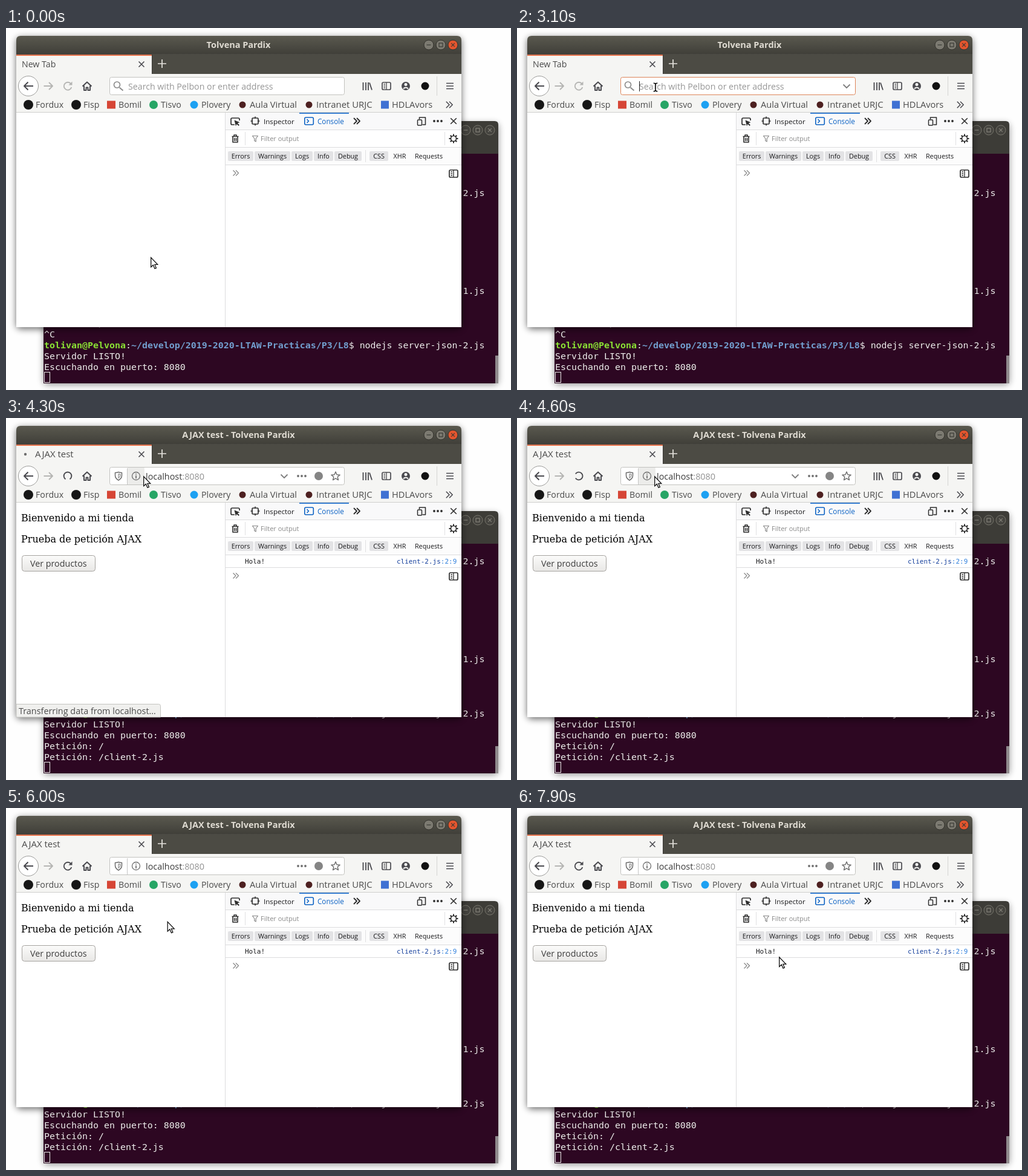
These frames come from a looping animation (835 by 599 pixels, 8000 ms). An HTML page:

```html
<!DOCTYPE html>
<html lang="es">
<head>
<meta charset="utf-8">
<title>AJAX test</title>
<style>
html, body { margin: 0; width: 100%; height: 100%; overflow: hidden; background: #fefefe; }
svg { display: block; width: 100%; height: 100%; }
text { font-family: "Open Sans", "Noto Sans", sans-serif; white-space: pre; }
.mono { font-family: "DejaVu Sans Mono", monospace; }
.serif { font-family: "DejaVu Serif", serif; }
.b { font-weight: 700; }
</style>
</head>
<body>
<svg id="stage" viewBox="0 0 835 599"></svg>
<script>
const LOOP = 8000;
const LOADED = 4300;
const INK = '#4a4a4f', GRAY = '#8c8c8c', DARK = '#2e2e2e', BLUE = '#0b62c4';
const stage = document.getElementById('stage');

// Drawing helpers
const text = (x, y, s, size = 14.2, fill = '#4b4b4b', more = '') =>
  `<text x="${x}" y="${y}" font-size="${size}" fill="${fill}" ${more}>${s}</text>`;
const box = (x, y, w, h, fill, more = '') =>
  `<rect x="${x}" y="${y}" width="${w}" height="${h}" fill="${fill}" ${more}/>`;
const disc = (x, y, r, fill, more = '') =>
  `<circle cx="${x}" cy="${y}" r="${r}" fill="${fill}" ${more}/>`;
const path = (d, stroke = INK, w = 1.6, more = '') =>
  `<path d="${d}" fill="none" stroke="${stroke}" stroke-width="${w}" stroke-linejoin="round" ${more}/>`;
const group = (id, body, more = '') => `<g id="${id}" ${more}>${body}</g>`;
const bold = s => `<tspan class="b">${s}</tspan>`;
const paint = (s, fill, cls = '') => `<tspan fill="${fill}" class="${cls}">${s}</tspan>`;

// Small icons
const cross = (x, y, r, c, w) => path(`M${x - r} ${y - r}l${2 * r} ${2 * r}m0 ${-2 * r}l${-2 * r} ${2 * r}`, c, w);
const guillemet = (x, y, c, r = 5, w = 1.6) =>
  path(`M${x - r} ${y - r}l${r} ${r} ${-r} ${r}m${r} ${-2 * r}l${r} ${r} ${-r} ${r}`, c, w);
const chevron = (x, y) => path(`M${x - 5.5} ${y - 2.5}l5.5 5.5 5.5 -5.5`, '#808080', 1.8);
const dots = (x, y, c, gap = 6) => [-gap, 0, gap].map(d => disc(x + d, y, 1.9, c)).join('');
const gear = (x, y, r, c) => {
  let d = '';
  for (let i = 0; i < 8; i++) {
    const a = i * Math.PI / 4, u = Math.cos(a), v = Math.sin(a);
    d += `M${x + u * r} ${y + v * r}L${x + u * (r + 3)} ${y + v * (r + 3)}`;
  }
  return disc(x, y, r, 'none', `stroke="${c}" stroke-width="1.7"`) + path(d, c, 2);
};
const globe = (x, y, c) => disc(x, y, 7.2, 'none', `stroke="${c}" stroke-width="1.4"`) +
  `<ellipse cx="${x}" cy="${y}" rx="3.4" ry="7.2" fill="none" stroke="${c}" stroke-width="1.2"/>` +
  path(`M${x - 6.5} ${y - 2.6}h13M${x - 6.5} ${y + 2.6}h13`, c, 1.2);
const panel = (x, y, c) => box(x - 7, y - 6, 14, 12, 'none', `rx="2" stroke="${c}" stroke-width="1.7"`) +
  path(`M${x} ${y - 6}v12M${x - 4.5} ${y - 3}h2.5m-2.5 3h2.5m-2.5 3h2.5`, c, 1.3);
const windowButtons = (x, y, close, rim, fill, mark) => [0, 1, 2].map(i => {
  const cx = x + i * 20;
  return disc(cx, y, 8, i == 2 ? close : fill, `stroke="${rim}" stroke-width="1"`) + [
    path(`M${cx - 3.5} ${y}h7`, mark, 1.2),
    box(cx - 3, y - 3, 6, 6, 'none', `stroke="${mark}" stroke-width="1.2"`),
    cross(cx, y, 2.8, mark, 1.2)][i];
}).join('');

function terminal() {
  const row = (y, s, id) => text(63, y + 5, s, 14.95, '#eeeeec', `class="mono"${id ? ` id="${id}"` : ''}`);
  const prompt = n => paint('tolivan@Pelvona', '#8ae234', 'b') + ':' +
    paint('~/develop/2019-2020-LTAW-Practicas/P3/L8', '#729fcf', 'b') + `$ nodejs server-json-${n}.js`;
  const history = [[273, prompt(2)], [435, prompt(1)], [489, 'Petición: /'], [507, '^C'],
    [525, prompt(2)], [543, 'Servidor LISTO!'], [561, 'Escuchando en puerto: 8080']];
  return box(62, 158, 752, 432, '#000', 'rx="6" opacity=".42" filter="url(#soft)"') +
    `<path d="M62 588V160q0-6 6-6H808q6 0 6 6V588z" fill="#3d3c37"/>` +
    windowButtons(760, 169, '#45443f', '#77756c', '#45443f', '#85837a') +
    box(62, 208, 752, 380, '#2d0722') +
    '<g clip-path="url(#screen)">' +
    group('log', history.map(r => row(...r)).join('') +
      group('requests', row(579, 'Petición: /') + row(597, 'Petición: /client-2.js'))) + '</g>' +
    box(63.5, 569.5, 9, 17, 'none', 'stroke="#eeeeec"') +
    box(809, 542, 5, 46, '#8f8a8c', 'id="thumb"');
}

function toolbar() {
  const marks = [[49, 'Fordux'], [128, 'Fisp'], [186, 'Bomil'], [256, 'Tisvo'], [323, 'Plovery'],
    [403, 'Aula Virtual', 14.6], [513, 'Intranet URJC', 14.9], [638, 'HDLAvors', 14.6]];
  return path('M45 96H30m6 -6l-6 6 6 6', INK, 1.9) +
    disc(37, 96, 16.5, '#fff', 'stroke="#9b9b99"') + path('M45 96H30m6.5 -6.5l-6.5 6.5 6.5 6.5', INK, 2) +
    path('M62.5 96H77m-6 -6l6 6 -6 6', '#b5b5b3', 1.9) +
    group('reload', path('M107.2 92.2A6.4 6.4 0 1 0 108.3 98', 'currentColor', 1.9) +
      '<path d="M109.5 88.5v6h-6z" fill="currentColor"/>') +
    group('spin', path('M98.5 101.2A6.4 6.4 0 1 1 105.5 101.2', INK, 1.9)) +
    path('M126.5 96.5L134 89.5l7.500 7M129 95.500V103h3.500v-4.500h3V103h3.500V95.500', INK, 2) +
    path('M590.5 90v13M595 90v13M599 90v13M601 90.500l4 12', INK, 1.8) + panel(629, 96, INK) +
    disc(661, 96, 7, INK) + disc(661, 93.600, 2.5, '#f5f5f3') +
    path('M657 100.500q4 -4 8 0', '#f5f5f3', 1.8) + disc(693, 96, 6.5, '#111') +
    path('M712.5 80v32', '#d5d5d2', 1) + path('M728 91.500h12m-12 4.500h12m-12 4.500h12', INK, 1.6) +
    disc(37, 127, 8, '#161616') + disc(116, 127, 8, '#161616') + box(167, 120.500, 14, 13, '#d64535') +
    disc(244, 127, 7, '#27a565') + disc(311, 127, 6.5, '#1da1f2') +
    disc(391, 127, 5.5, '#4d2020') + disc(501, 127, 5.5, '#4d2020') + box(620, 120.500, 13, 13, '#3f71d3') +
    marks.map(([x, s, size]) => text(x, 132, s, size)).join('') + guillemet(733, 127, INK, 5.2);
}

function addressBar() {
  const lens = path('M187.6 98.400L193.5 103.500', GRAY, 2) +
    disc(183.5, 94, 5, 'none', `stroke="${GRAY}" stroke-width="1.7"`);
  const star = Array.from({length: 10}, (_, i) => {
    const a = i * Math.PI / 5 - Math.PI / 2, r = i % 2 ? 3.4 : 7.5;
    return `${545 + r * Math.cos(a)},${96.5 + r * Math.sin(a)}`;
  });
  return box(171.5, 81.5, 388, 29, '#fff', 'id="bar" rx="3"') +
    group('lens', lens) +
    text(202, 102, 'Search with Pelbon or enter address', 14.2, '#969696', 'id="hint"') +
    text(202, 102, 'localhost:8080', 14.4, '#3a3a3a', 'id="typed"') +
    group('go', path('M537 96h15m-6 -6l6 6 -6 6', '#808080', 1.7)) +
    group('site', box(201, 82, 28, 28, '#ececea', 'id="glow"') +
      path('M180.500 90.500q3 0 5.500 -1 2.500 1 5.500 1v4.500q0 5 -5.500 8 -5.500 -3 -5.500 -8z', '#6e6e6e', 1.5) +
      path('M186 92.500v7q3 -2 3 -4.500v-2q-1.500 0 -3 -.5', '#6e6e6e', 1) +
      path('M200.500 83v27', '#c5c5c5', 1) + disc(215, 96, 6.5, 'none', 'stroke="#6e6e6e" stroke-width="1.3"') +
      path('M215 95v5M215 92v1.600', '#6e6e6e', 1.7) +
      text(231, 102, 'localhost' + paint(':8080', '#909090'), 14.4, '#3a3a3a') +
      dots(489, 96, '#707070') + disc(517, 96, 7, '#858585') +
      `<polygon points="${star.join(' ')}" fill="none" stroke="#707070" stroke-width="1.5" stroke-linejoin="round"/>`) +
    group('arrowDown', chevron(0, 96)) + path('M0 88v17', '#222', 1, 'id="caret"');
}

function devtools() {
  const filters = [[367, 42, 'Errors'], [411, 59, 'Warnings'], [472, 35, 'Logs'], [509, 32, 'Info'],
    [543, 45, 'Debug'], [601, 31, 'CSS'], [640, 22, 'XHR', 1], [676, 46, 'Requests', 1]];
  return box(363, 140, 390, 28, '#f9f9fa') + box(363, 198, 390, 28, '#fcfcfc') +
    path('M362.5 140V495M363 168.500H753M363 197.500H753M363 226.500H753', '#dcdcde', 1) +
    path('M378 160h-4q-2 0 -2 -2v-7q0 -2 2 -2h10q2 0 2 2v2', DARK, 1.7) +
    `<path d="M377.500 152.500l9 3.500-3.600 1.600 3 3-1.400 1.400-3-3-1.500 3.500z" fill="${DARK}"/>` +
    box(407, 149, 10, 10, 'none', `rx="1.500" stroke="${DARK}" stroke-width="1.700"`) +
    path('M412 146.500v3M412 158.500v3M404.500 154h3M416.500 154h3', DARK, 1.6) +
    text(426, 159, 'Inspector', 11.6, '#18181a') + box(485, 140, 82, 2, '#3a80d2') +
    box(493.8, 148, 14.5, 12, 'none', `rx="2" stroke="${BLUE}" stroke-width="1.600"`) +
    path('M497.500 151l3 3 -3 3', BLUE, 1.5) + text(515, 159, 'Console', 11.7, BLUE) +
    guillemet(580, 154, DARK, 5, 1.8) +
    path('M683.500 151v-3h10v12h-5', DARK, 1.6) + box(680.500, 152, 7, 9, 'none', `rx="1" stroke="${DARK}" stroke-width="1.500"`) +
    dots(714, 154, DARK) + cross(740, 154, 4.8, DARK, 1.6) +
    path('M373.500 179.500h11M377 179v-2h4v2M375 180v9h8v-9M377.700 182v5M380.500 182v5', DARK, 1.6) +
    path('M395.500 172v22M725.500 172v22M594.500 202v20', '#e0e0e2', 1) +
    path('M407.500 178.500h9l-3.300 4.500v5l-2.400 -1.500v-3.500z', '#8a8a8a', 1.2) +
    text(421, 187, 'Filter output', 11, '#8a8a8a') + gear(740, 183, 4.5, DARK) +
    filters.map(([x, w, s, plain]) => (plain ? '' : box(x, 204, w, 16, '#e3e3e5', 'rx="2"')) +
      text(x + w / 2, 216, s, 10.8, '#18181a', 'text-anchor="middle"')).join('') +
    group('prompt', guillemet(380, 240, '#8a8a8a', 4.5, 1.4) + panel(740, 241, DARK)) +
    group('output', path('M363 247.500H753', '#dcdcde', 1) + text(395, 241, 'Hola!', 11, '#18181a', 'class="mono"') +
      text(646, 241, 'client-2.js' + paint(':2:9', '#2f7fdc'), 11, '#143f9c', 'class="mono"'));
}

function page() {
  return group('page', text(25, 171, 'Bienvenido a mi tienda', 16, '#000', 'class="serif"') +
      text(25, 206, 'Prueba de petición AJAX', 16, '#000', 'class="serif"') +
      box(26.5, 227.5, 121, 26, 'url(#button)', 'rx="4" stroke="#a5a39f"') +
      text(40, 246, 'Ver productos', 14.3, '#3c3c3c')) +
    group('status', `<path d="M17 473.500H252.500q3 0 3 3V495H17z" fill="#f0f0ee" stroke="#c4c4c0"/>` +
      text(21, 490, 'Transferring data from localhost…', 14.4));
}

function suggestions() {
  const host = bold('localhost:8080');
  const rows = [
    ['Ochre server', 320, '127.0.0.1:8080'],
    ['A: Adenine', 305, host + '/info/A'],
    ['G: GUANINE', 314, host + '/info/G'],
    ['C: Cytosine', 307, host + '/info/C'],
    ['T: THYMINE', 310, host + '/info/T'],
    ['Ochre server', 320, '127.0.0.1:8080/favicon.ico'],
    [host, 336, host + '/login'],
    [host, 336, host + '/test'],
    [host, 336, host + '/info/Ad']];
  const engines = ['#4285f4', '#1b8a9b', '#161616', '#c01f1f', '#d9512c', '#86a82a', '#1da1f2', '#222'];
  return group('suggest', box(17, 116, 736, 379, '#fff') + path('M17 116.500H753', '#cfcfcc', 1) +
    box(21, 121, 728, 30, '#e77c58', 'rx="2"') + globe(186, 137, '#fff') +
    text(202, 142, 'http://' + bold('localhost:8080') + '/', 14.5, '#fff') +
    path('M366 137.500h15', '#fbd9cc', 1) + text(388, 142, 'Visit', 12.5, '#fff') +
    rows.map(([name, x, url], i) => {
      const y = 167 + i * 30;
      return globe(186, y, '#858585') + text(202, y + 5, name, name == host ? 14.8 : 14.4, '#3a3a3a') +
        path(`M${x - 22} ${y + .5}h15`, '#9a9a9a', 1) + text(x, y + 5, url, 12.7, '#1b80a6');
    }).join('') +
    path('M17 425.500H753', '#c8c8c8', 1) + text(178, 464, 'This time, search with:', 14.8, '#858585') +
    '<g clip-path="url(#window)">' + engines.map((c, i) => disc(186 + i * 40, 490, 6.5, c)).join('') +
    gear(544, 490, 4.5, '#6a6a6a') + '</g>');
}

function browser() {
  const frame = 'M17 495V20q0-7 7-7H746q7 0 7 7V495z';
  return box(17, 16, 736, 482, '#000', 'rx="7" opacity=".58" filter="url(#soft)"') +
    `<path d="${frame}" fill="#fff"/>` +
    '<path d="M17 43V20q0-7 7-7H746q7 0 7 7V43z" fill="url(#titlebar)"/>' +
    text(384.5, 33, '', 14.5, '#dfdbd2', 'id="title" class="b" text-anchor="middle"') +
    windowButtons(699, 28, '#e2552e', '#33322d', '#7c7a71', '#3a3934') +
    box(17, 43, 736, 33, '#4c4b44') + box(17, 44, 224, 32, '#f5f5f3') + box(17, 44, 224, 2, '#e6714a') +
    path('M241.500 44v32', '#3a3934', 1) +
    text(26, 65, '', 14.2, '#4b4b4b', 'id="tab"') + disc(32, 60, 2.2, '#6e6e6e', 'id="bead"') +
    cross(224, 60, 4.5, INK, 1.6) + path('M251 59h14m-7 -7v14', '#e6e4de', 1.7) +
    box(17, 76, 736, 63, '#f5f5f3') + path('M17 139.500H753', '#cfcfcc', 1) +
    toolbar() + addressBar() + devtools() + page() + suggestions();
}

function pointers() {
  const beam = 'M-3.300 -6.800q2.800 0 3.300 1.800 .5 -1.800 3.300 -1.800M0 -5V5M-3.300 6.800q2.800 0 3.300 -1.800 .5 1.800 3.300 1.800';
  return group('arrow', '<path d="M.7 .8V16.600L4.300 13.200 7 19.200 9.400 18.200 6.900 12.400H11.700z" fill="#fff" stroke="#111" stroke-width="1.300"/>') +
    group('beam', path(beam, '#fff', 3.6) + path(beam, '#000', 1.6));
}

stage.innerHTML = `<defs>
  <filter id="soft" x="-10%" y="-10%" width="120%" height="120%"><feGaussianBlur stdDeviation="6"/></filter>
  <linearGradient id="titlebar" x2="0" y2="1"><stop stop-color="#5a594f"/><stop offset="1" stop-color="#403f39"/></linearGradient>
  <linearGradient id="button" x2="0" y2="1"><stop stop-color="#fbfbfa"/><stop offset="1" stop-color="#e8e7e5"/></linearGradient>
  <clipPath id="screen"><rect x="62" y="208" width="752" height="380"/></clipPath>
  <clipPath id="window"><rect x="17" y="13" width="736" height="482"/></clipPath>
</defs>` + terminal() + browser() + pointers();

const el = {};
stage.querySelectorAll('[id]').forEach(n => el[n.id] = n);
const show = (id, on) => el[id].setAttribute('display', on ? 'inline' : 'none');
const move = (id, x, y) => el[id].setAttribute('transform', `translate(${x} ${y})`);

// Pointer moves: first step, last step, end x, end y; one step every 100 ms
const MOVES = [
  [900, 900, 242, 354], [1100, 1400, 236, 196], [1600, 1900, 233, 118], [2000, 2100, 226, 97],
  [3100, 3100, 227, 96], [5400, 5600, 248, 140], [5800, 6300, 285, 235], [6400, 6600, 278, 266],
  [6700, 6800, 386, 271], [6900, 7100, 422, 240], [7200, 7500, 373, 220], [7600, 7900, 433, 246]];

function pointerAt(t) {
  let x = 239, y = 379;
  for (const [from, to, ex, ey] of MOVES) {
    if (t < from) break;
    const steps = (to - from) / 100 + 1;
    const k = Math.min(1, (Math.floor((t - from) / 100) + 1) / steps);
    x += (ex - x) * k;
    y += (ey - y) * k;
  }
  return [x, y];
}

function render(t) {
  const loaded = t >= LOADED, loading = loaded && t < 4600;
  const focus = t >= 2300 && !loaded, typed = t >= 3300 && !loaded;
  const [x, y] = pointerAt(t);
  const overBar = y > 82 && y < 111;

  el.title.textContent = (loaded ? 'AJAX test - ' : '') + 'Tolvena Pardix';
  el.tab.textContent = loaded ? 'AJAX test' : 'New Tab';
  el.tab.setAttribute('x', loading ? 48 : 26);
  el.tab.setAttribute('font-size', loaded ? 15 : 14.2);
  show('bead', loading);
  el.bead.setAttribute('cx', 32 + Math.floor((t - LOADED) / 100) * 2);

  const spinning = loaded && t < 4700;
  show('spin', spinning);
  show('reload', !spinning);
  el.spin.setAttribute('transform', `rotate(${Math.floor((t - LOADED) / 100) * 30} 102 96)`);
  el.reload.setAttribute('color', loaded ? INK : '#b5b5b3');

  el.bar.setAttribute('stroke', focus ? '#dd8459' : '#c2c2bf');
  show('lens', !loaded);
  show('hint', t < 3300);
  show('typed', typed);
  show('go', typed);
  show('site', loaded);
  show('glow', loaded && t < 4800);
  show('arrowDown', overBar && !typed);
  move('arrowDown', loaded ? 460 : 545, 0);
  show('caret', focus && t < 3600);
  move('caret', typed ? 299.5 : 202.5, 0);
  show('suggest', t >= 3400 && !loaded);

  show('page', loaded);
  show('status', loading);
  show('output', loaded);
  move('prompt', 0, loaded ? 21 : 0);
  show('requests', loaded);
  move('log', 0, loaded ? -36 : 0);
  el.thumb.setAttribute('y', loaded ? 543 : 542);
  el.thumb.setAttribute('height', loaded ? 45 : 46);

  const inBar = overBar && !(loaded && t < 5300);
  const inConsole = loaded && x > 366 && y > 249;
  show('beam', inBar || inConsole);
  show('arrow', !inBar && !inConsole);
  move('arrow', x, y);
  move('beam', x + 2, y + 2);
}

function tick() {
  render(performance.now() % LOOP);
  requestAnimationFrame(tick);
}
tick();
</script>
</body>
</html>
```
